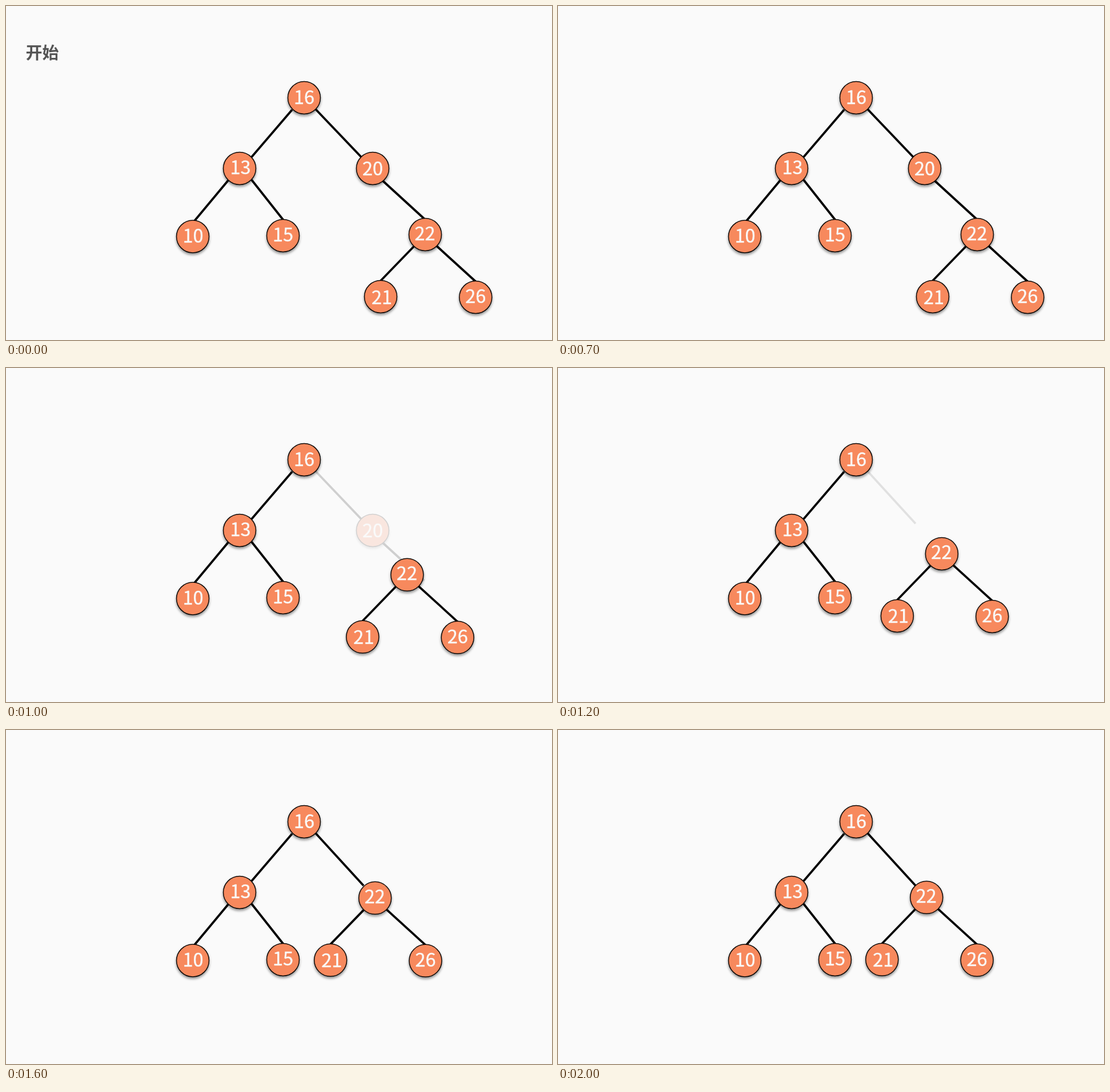
An HTML page that plays this animation: 956x586 px, repeating every 2.2 s.

```html
<!DOCTYPE html>
<html lang="zh">
<head>
<meta charset="utf-8">
<style>
  html, body { margin: 0; width: 100%; height: 100%; overflow: hidden; background: #fafafa; }
  svg { display: block; width: 100vw; height: 100vh; }
  text { font-family: "Noto Sans CJK SC", "Noto Sans CJK", "Noto Sans CJK JP", sans-serif; }
  line { stroke: #000; stroke-width: 3.8; }
  circle { fill: #f7895d; stroke: #0c0806; stroke-width: 1.5; filter: drop-shadow(0 3px 2px rgba(0, 0, 0, .42)); }
  .value { font-size: 32.5px; fill: #fafafa; stroke: #fafafa; stroke-width: .4; text-anchor: middle; }
  #title { font-size: 29px; font-weight: 700; fill: #555; }
</style>
</head>
<body>
<svg viewBox="0 0 956 586">
  <text id="title" x="34.5" y="92.5">开始</text>
  <g id="newEdge"></g>
  <g id="removed"></g>
  <g id="fixed"></g>
  <g id="subtree"></g>
</svg>
<script>
const LOOP = 2200, STEP = 100;
const SHIFT = { x: -88.7, y: -107.2 };
const layer = id => document.getElementById(id);

function add(parent, tag, attrs, text = '') {
  const el = document.createElementNS('http://www.w3.org/2000/svg', tag);
  for (const key in attrs) el.setAttribute(key, attrs[key]);
  el.textContent = text;
  parent.append(el);
}

function edge(id, x1, y1, x2, y2) {
  add(layer(id), 'line', { x1, y1, x2, y2 });
}

// dx and baseline place the number relative to the circle's centre
function node(id, value, cx, cy, dx, baseline) {
  add(layer(id), 'circle', { cx, cy, r: 28.5 });
  add(layer(id), 'text', { class: 'value', x: cx + dx, y: cy + baseline }, value);
}

edge('newEdge', 542, 181, 626, 273);

edge('removed', 542, 181, 622, 265);
edge('removed', 660, 307, 732, 373);
node('removed', 20, 642, 285, 0, 12);

edge('fixed', 501, 182, 430, 265);
edge('fixed', 389, 306, 330, 377);
edge('fixed', 430, 305, 486, 376);
node('fixed', 16, 522, 161, 0, 10.5);
node('fixed', 13, 409, 285, 1.5, 9.5);
node('fixed', 10, 327, 404.5, 0.5, 10.5);
node('fixed', 15, 485, 403, 0, 10);

edge('subtree', 714, 422, 656, 482);
edge('subtree', 754, 421, 823, 484);
node('subtree', 22, 734, 401, -0.5, 9.5);
node('subtree', 21, 656, 510, 2, 12.5);
node('subtree', 26, 822.3, 511, 0, 10);

const ramp = (t, from, to) => Math.min(1, Math.max(0, (t - from) / (to - from)));

// Monotone cubic through [time, progress] keys
const keys = [[750, 0], [900, .188], [1200, .7], [1400, .906], [1600, .99], [1800, 1]];

const chord = i => (keys[i + 1][1] - keys[i][1]) / (keys[i + 1][0] - keys[i][0]);

function slope(i) {
  if (i === 0 || i === keys.length - 1) return 0;
  const a = chord(i - 1), b = chord(i);
  return 2 * a * b / (a + b);
}

function progress(t) {
  if (t <= keys[0][0]) return 0;
  const i = keys.findIndex(key => key[0] > t) - 1;
  if (i < 0) return 1;
  const [t0, p0] = keys[i], [t1, p1] = keys[i + 1];
  const h = t1 - t0, u = (t - t0) / h, v = 1 - u;
  return p0 * v * v * (1 + 2 * u) + p1 * u * u * (3 - 2 * u)
    + h * u * v * (slope(i) * v - slope(i + 1) * u);
}

function draw(t) {
  const p = progress(t);
  layer('title').setAttribute('opacity', t < 700 ? 1 : 0);
  layer('removed').setAttribute('opacity', 1 - ramp(t, 750, 1050));
  layer('newEdge').setAttribute('opacity', ramp(t, 1170, 1477));
  layer('subtree').setAttribute('transform', `translate(${SHIFT.x * p} ${SHIFT.y * p})`);
}

const start = performance.now();
function tick() {
  const t = (performance.now() - start) % LOOP;
  draw(Math.floor(t / STEP) * STEP);
  requestAnimationFrame(tick);
}
tick();
</script>
</body>
</html>
```
